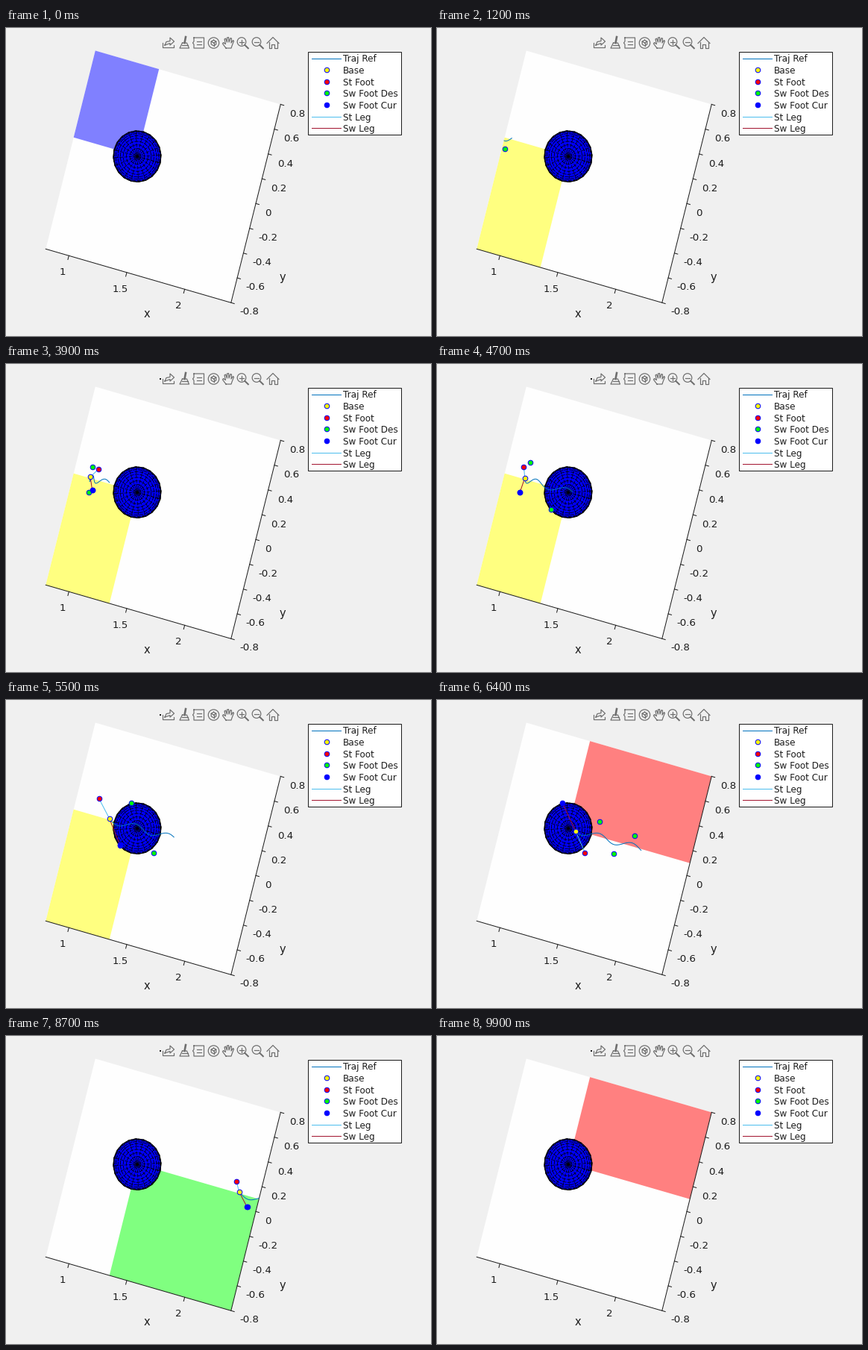
Animation of 570 by 413 pixels, one loop 10000 ms. Source, as a matplotlib script:

```python
import numpy as np
import matplotlib
import matplotlib.pyplot as plt
from matplotlib.animation import FuncAnimation
from matplotlib.patches import Circle, Polygon, Rectangle

matplotlib.rcParams["font.family"] = "DejaVu Sans"

W, H, DPI = 570, 413, 64
FRAMES, STEP, PREVIEW = 100, 4, 16
PX = 72 / DPI  # points per pixel
XMIN, XMAX, YMIN, YMAX = 0.8, 2.4, -0.8, 0.8
XMID, YMID, RADIUS = 1.35, 0.1, 0.2
INK, ICON = "#1c1c1c", "#6e6e6e"
BLUE, REF, ST_LEG, SW_LEG = "#0000ff", "#0072bd", "#4dbeee", "#a2142f"

fig = plt.figure(figsize=(W / DPI, H / DPI), dpi=DPI, facecolor="#f0f0f0")
ax = fig.add_axes([0, 0, 1, 1])
ax.set_xlim(0, W)
ax.set_ylim(H, 0)
ax.axis("off")


def to_px(x, y):
    """Ground coordinates to stage pixels."""
    u, v = np.asarray(x) - XMIN, np.asarray(y) - YMIN
    return 53.3 + 155.3 * u + 41.55 * v, 296.3 + 45 * u - 166.2 * v


def line(xs, ys, color=INK, width=1.0, z=3, **kw):
    return ax.plot(xs, ys, color=color, lw=width * PX, zorder=z, **kw)[0]


def label(x, y, s, size, ha="left"):
    ax.text(x, y, s, fontsize=size * PX, color=INK, ha=ha, va="baseline", zorder=8)


def dots(face, z):
    return ax.plot([], [], "o", ms=6.6 * PX, mfc=face, mec=BLUE,
                   mew=PX, ls="none", zorder=z)[0]


def rect(x0, x1, y0, y1, color):
    pts = np.column_stack(to_px([x0, x1, x1, x0], [y0, y0, y1, y1]))
    return ax.add_patch(Polygon(pts, fc=color, ec="none", lw=0, zorder=1))


# ---------- ground and axes ----------
ground = rect(XMIN, XMAX, YMIN, YMAX, "#fefefe")
upper, lower = (YMID, YMAX), (YMIN, YMID)
left, right = (XMIN, XMID), (XMID, XMAX)
quads = {  # (is right, is lower)
    (0, 0): rect(*left, *upper, "#8080ff"),
    (0, 1): rect(*left, *lower, "#ffff80"),
    (1, 0): rect(*right, *upper, "#ff8080"),
    (1, 1): rect(*right, *lower, "#80ff80"),
}

line(*to_px([XMIN, XMAX, XMAX], [YMIN, YMIN, YMAX]), z=2)
for i in range(9):
    v = (4 - i) / 5
    x, y = to_px(XMAX, v)
    line([x, x + 4.4], [y, y + 1.3], z=2)
    label(380.6 - 8.4 * i, 119.4 + 33.05 * i, f"{v:g}", 13.33)
for i in range(3):
    v = 1 + i / 2
    x, y = to_px(v, YMIN)
    line([x, x - 1.4], [y, y + 5.2], z=2)
    label(x - 8.5, y + 26, f"{v:g}", 13.33, "center")
label(189, 388.5, "x", 14.67, "center")
label(371, 339, "y", 14.67, "center")

# ---------- sphere seen from above ----------
turn = np.linspace(0, 2 * np.pi, 21)


def ring(r):
    return to_px(XMID + RADIUS * r * np.cos(turn), YMID - 0.004 + RADIUS * r * np.sin(turn))


ax.add_patch(Polygon(np.column_stack(ring(1)), fc=BLUE, ec="black", lw=PX, zorder=2))
for r in np.cos(np.radians(np.arange(0, 90, 9))):
    line(*ring(r), "black", 0.8, 2.1, dashes=(7, 1.5))
cx, cy = to_px(XMID, YMID - 0.004)
for ex, ey in zip(*ring(1)):
    line([cx, ex], [cy, ey], "black", 0.7, 2.1, dashes=(7, 2))

# ---------- legend ----------
ax.add_patch(Rectangle((405, 31.6), 125, 111, fc="white", ec=INK, lw=PX, zorder=6))
entries = (("Traj Ref", REF, 0), ("Base", "yellow", 1), ("St Foot", "red", 1),
           ("Sw Foot Des", "lime", 1), ("Sw Foot Cur", BLUE, 1),
           ("St Leg", ST_LEG, 0), ("Sw Leg", SW_LEG, 0))
for i, (name, color, is_dot) in enumerate(entries):
    y = 40.5 + 15.65 * i
    label(452, y + 4.8, name, 12)
    if is_dot:
        dots(color, 7).set_data([429.8], [y - 0.2])
    else:
        line([410, 449], [y, y], color, z=7)


# ---------- toolbar icons ----------
def stroke(*pts, width=1.2):
    line(*zip(*pts), ICON, width)


def disc(x, y, r):
    ax.add_patch(Circle((x, y), r, fc="none", ec=ICON, lw=1.2 * PX, zorder=3))


# export
stroke((210, 20), (210, 26), (225, 26), (225, 23))
stroke((213, 23), (215, 18.5), (220, 17.5), (220, 13), (225.5, 18), (220, 23),
       (220, 20.5), (213, 23))
# brush
stroke((241, 12), (239.5, 20), width=2.6)
stroke((236.5, 20), (242.5, 20), (245.5, 27), (233, 27), (236.5, 20))
stroke((236, 23), (244, 23))
# data tip
stroke((252, 13), (265.5, 13), (265.5, 27), (252, 27), (252, 22), (250.5, 20),
       (252, 18), (252, 13))
for y in (18, 22):
    stroke((255.5, y), (262, y))
# rotate
disc(278.5, 20, 7.2)
hexagon = [(278.5 + 3.8 * np.sin(a), 20 - 3.8 * np.cos(a))
           for a in np.radians(np.arange(0, 361, 60))]
stroke(*hexagon)
for corner in hexagon[1:6:2]:
    stroke((278.5, 20), corner)
# hand
stroke((295, 27), (290.5, 21), (291.5, 19.5), (294.5, 21.5), (293, 15), (294.5, 14),
       (296.5, 19), (296.5, 13), (298.5, 12.5), (299, 19), (301, 13.5), (302.5, 14),
       (302, 20), (304.5, 16.5), (305.5, 17.5), (303, 24), (302, 27), (295, 27))
# zoom in, zoom out
for x in (316, 336):
    disc(x, 18.5, 5.8)
    stroke((x + 4.3, 22.8), (x + 8.8, 27.2), width=2)
    stroke((x - 3, 18.5), (x + 3, 18.5))
stroke((316, 15.5), (316, 21.5))
# home
stroke((350, 20.5), (358, 12.5), (366, 20.5))
stroke((352.5, 19), (352.5, 27), (356, 27), (356, 21.5), (360, 21.5), (360, 27),
       (363.5, 27), (363.5, 19))
speck = ax.add_patch(Rectangle((206.3, 18.7), 1.6, 2.6, fc=INK, ec="none", zorder=3))


# ---------- gait ----------
def ease(p):
    p = np.clip(p, 0, 1)
    return p * p * (3 - 2 * p)


def bump(k, center, width):
    return np.exp(-((k - center) / width) ** 2)


def base(n):
    """Steady walk that nearly stalls before the sphere, swaying with each step."""
    along = 0.0353 * n - 0.077 - 0.766 * ease((n - 22.5) / 34.5)
    return along, YMID - 0.026 * np.cos(np.pi * (n - 1.5) / STEP)


def landing(k):
    """Where step k lands: even steps are the upper foot, odd the lower."""
    side = -1 if k % 2 else 1
    wide = bump(k, 13.7, 2.3)  # stretched stance while passing the sphere
    lead = 0.06 - 0.08 * side * wide - 0.1 * bump(k, 11, 1.6)
    return np.array([base(STEP * (k + 1))[0] + lead,
                     YMID + side * (0.085 + 0.09 * wide)])


path = line([], [], REF)
st_leg = line([], [], ST_LEG, z=3.1)
sw_leg = line([], [], SW_LEG, z=3.2)
for item in (path, st_leg, sw_leg):
    item.set_clip_path(ground)
base_dot, st_dot, des_dots, cur_dot = (
    dots(c, 4 + 0.1 * i) for i, c in enumerate(("yellow", "red", "lime", BLUE)))


def place(artist, *pts):
    x, y = np.array(pts).T
    inside = (x >= XMIN) & (x <= XMAX)
    artist.set_data(*to_px(x[inside], y[inside]))


def update(n):
    k, phase = divmod(n, STEP)
    s = ease(phase / STEP / 0.8)
    body = np.array(base(n))
    stance = landing(k - 1)
    swing = (1 - s) * landing(k - 2) + s * landing(k)

    active = (int(landing(k)[0] > XMID), k % 2)
    for key, quad in quads.items():
        quad.set_visible(key == active)

    path.set_data(*to_px(*base(np.linspace(n, n + PREVIEW, 70))))
    st_leg.set_data(*to_px(*np.array([body, stance]).T))
    sw_leg.set_data(*to_px(*np.array([body, swing]).T))
    place(base_dot, body)
    place(st_dot, stance)
    place(des_dots, *(landing(k + j) for j in range(3)))
    place(cur_dot, swing)
    speck.set_visible(n % 2 == 1)
    return ()


anim = FuncAnimation(fig, update, frames=FRAMES, interval=100, repeat=True,
                     repeat_delay=0, blit=False)
plt.show()
```
